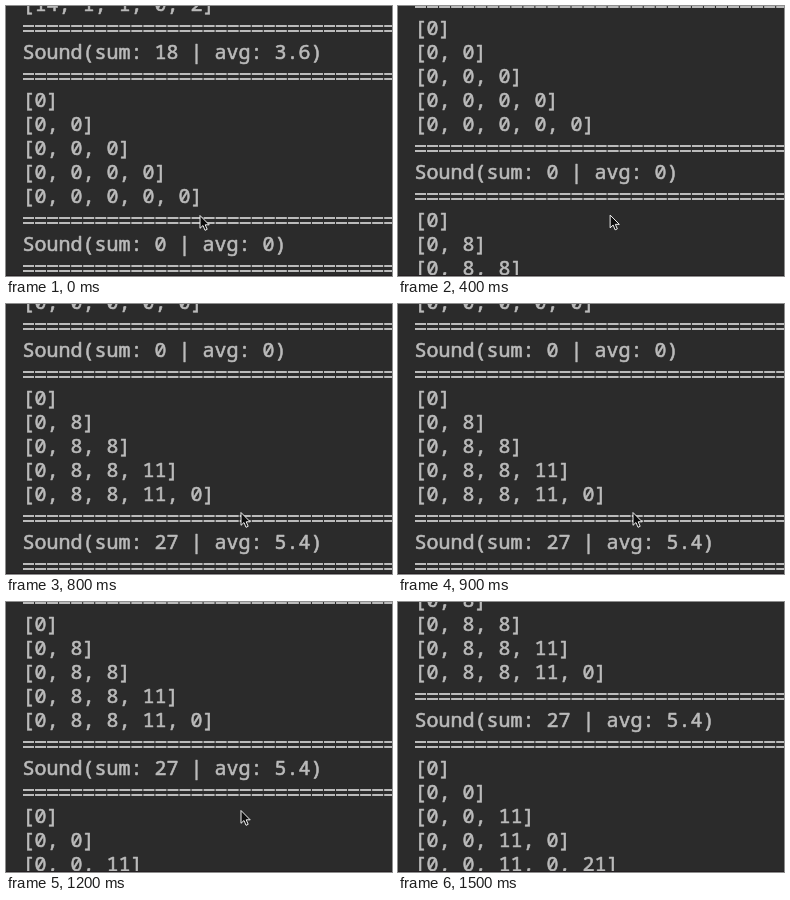
These frames come from a looping animation (386x270 px, 1.6 s). An HTML page with a canvas:

```html
<!DOCTYPE html>
<html lang="en">
<head>
<meta charset="utf-8">
<title>Console output</title>
<style>
  html, body { margin: 0; width: 100%; height: 100%; overflow: hidden; background: #2b2b2b; }
  canvas { display: block; }
</style>
</head>
<body>
<canvas id="stage" width="386" height="270"></canvas>
<script>
const ctx = document.getElementById("stage").getContext("2d");
const WIDTH = 386, HEIGHT = 270;
const LOOP = 1600, STEP = 100;
const LINE = 24, LEFT = 16.5, BASELINE = 5;
const FIRST_BURST = 400, ROUND_TIME = 800, ROUND_LINES = 8;
const POINTER_HIDDEN = 1500;
const RULE = "=";

const rounds = [
  [14, 1, 1, 0, 2],
  [0, 0, 0, 0, 0],
  [0, 8, 8, 11, 0],
  [0, 0, 11, 0, 21]
];

// Each round prints its growing list, then a ruled summary.
function printRound(values) {
  const sum = values.reduce((a, b) => a + b, 0);
  const lists = values.map((_, i) => `[${values.slice(0, i + 1).join(", ")}]`);
  return [...lists, RULE, `Sound(sum: ${sum} | avg: ${sum / values.length})`, RULE];
}
const lines = rounds.flatMap(printRound).slice(4);

// Every round opens with three lines at once, adds two more, then its summary.
function scrollAt(t) {
  const elapsed = t - FIRST_BURST;
  if (elapsed < 0) return 0;
  const phase = elapsed % ROUND_TIME;
  const printed = phase < 400 ? Math.min(5, 3 + Math.floor(phase / 150)) : ROUND_LINES;
  return Math.floor(elapsed / ROUND_TIME) * ROUND_LINES + printed;
}

function smoothstep(from, to, t) {
  const u = Math.min(1, Math.max(0, (t - from) / (to - from)));
  return u * u * (3 - 2 * u);
}

function drawRule(y) {
  ctx.setLineDash([11, 1.04]);
  ctx.lineWidth = 2;
  for (const barY of [y - 9, y - 4]) {
    ctx.beginPath();
    ctx.moveTo(LEFT + 0.5, barY);
    ctx.lineTo(WIDTH, barY);
    ctx.stroke();
  }
  ctx.setLineDash([]);
}

function drawText(text, y) {
  ctx.lineWidth = 0.6;
  ctx.fillText(text, LEFT, y - 0.5);
  ctx.strokeText(text, LEFT, y - 0.5);
}

function drawPointer(t) {
  const move = smoothstep(100, 750, t);
  ctx.save();
  ctx.translate(194 + 41 * move, 209.5 - move);
  const arrow = new Path2D("M0 0V12.8L3 10L5 14.8L7.2 13.8L5.2 9.3H9.2Z");
  ctx.fillStyle = "#0c0c0c";
  ctx.fill(arrow);
  ctx.strokeStyle = "#f0f0f0";
  ctx.lineWidth = 1;
  ctx.stroke(arrow);
  ctx.restore();
}

function draw(t) {
  ctx.fillStyle = "#2b2b2b";
  ctx.fillRect(0, 0, WIDTH, HEIGHT);

  ctx.font = '20px "Noto Sans Mono", "DejaVu Sans Mono", monospace';
  ctx.fillStyle = ctx.strokeStyle = "#bbbbbb";
  ctx.lineJoin = "round";
  const scroll = scrollAt(t);
  lines.slice(scroll, scroll + 12).forEach((text, row) => {
    const y = BASELINE + row * LINE;
    if (text === RULE) drawRule(y);
    else drawText(text, y);
  });

  ctx.fillStyle = "#241f22";
  ctx.fillRect(0, HEIGHT - 1, WIDTH, 1);

  if (t < POINTER_HIDDEN) drawPointer(t);
}

function tick() {
  const t = performance.now() % LOOP;
  draw(Math.floor(t / STEP) * STEP);
  requestAnimationFrame(tick);
}
tick();
</script>
</body>
</html>
```
